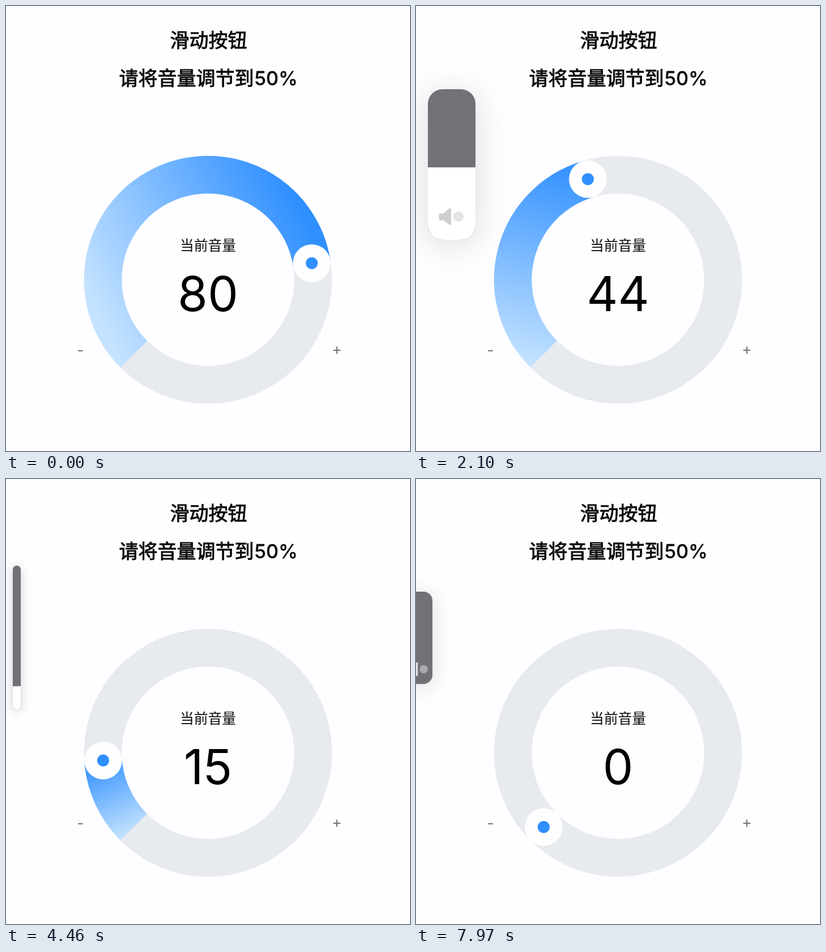
Write an HTML page that moves like this. It is 713x786 px and loops after 8000 ms.

```html
<!DOCTYPE html>
<html lang="zh-CN">
<head>
<meta charset="utf-8">
<title>滑动按钮</title>
<style>
  html, body { margin: 0; width: 100%; height: 100%; overflow: hidden; background: #fefdff; }
  #dial { position: absolute; left: 0; top: 0; width: 713px; height: 786px; }
  text { font-family: Inter, "Noto Sans CJK SC", "Noto Sans CJK", sans-serif; fill: #0b0b0d; }
  .cjk { font-family: "Noto Sans CJK SC", "Noto Sans CJK", sans-serif; }
  .head { font-size: 34px; stroke: #0b0b0d; stroke-width: .9px; }
  .head.latin { font-weight: 500; stroke-width: .3px; }
  .sign { font-size: 27px; fill: #77777b; }
  #hud { position: absolute; overflow: hidden; background: #737175; }
  #level { position: absolute; left: 0; right: 0; bottom: 0; background: #fff; }
  #icons { position: absolute; width: 46px; height: 34px; margin: -17px 0 0 -23px; }
</style>
</head>
<body>
<svg id="dial" viewBox="0 0 713 786">
  <defs>
    <linearGradient id="blue" gradientUnits="userSpaceOnUse">
      <stop offset="0" stop-color="#c5e3ff"/>
      <stop offset="1" stop-color="#2f8fff"/>
    </linearGradient>
  </defs>
  <text class="cjk head" x="357.5" y="72.5" text-anchor="middle">滑动按钮</text>
  <text class="cjk head" x="199.5" y="140">请将音量调节到</text>
  <text class="head latin" x="438.5" y="139.5">50%</text>
  <circle cx="356.5" cy="483.5" r="185.5" fill="none" stroke="#e7eaef" stroke-width="66.5"/>
  <path id="arc" fill="none" stroke="url(#blue)" stroke-width="66.5"/>
  <g id="knob">
    <circle r="33.3" fill="#fffeff"/>
    <circle r="10.6" fill="#2f8fff"/>
  </g>
  <text class="cjk" x="356.5" y="432" font-size="24.7" text-anchor="middle">当前音量</text>
  <text id="num" x="356.5" y="539" font-size="85.5" text-anchor="middle" style="fill:#000">80</text>
  <text class="sign" x="131.5" y="616.5" text-anchor="middle">-</text>
  <text class="sign" x="584" y="615.5" text-anchor="middle">+</text>
</svg>
<div id="hud">
  <div id="level"></div>
  <svg id="icons" viewBox="0 0 46 34">
    <path id="speaker" d="M2 11.5h6.5L19 2.5q3-1.5 3 1v27q0 2.5-3 1L8.5 23.5H2q-1.5 0-1.5-1.5v-9q0-1.5 1.5-1.5z"/>
    <circle id="dot" cx="35" cy="17" r="9"/>
  </svg>
</div>
<script>
  const LOOP = 8000, CX = 356.5, CY = 483.5, R = 185.5;
  const LAG = 270; // the side bar trails the dial
  const $ = id => document.getElementById(id);
  const mix = (a, b, k) => a + (b - a) * k;
  const clamp = k => Math.min(1, Math.max(0, k));
  const ease = (t, from, span) => {
    const k = clamp((t - from) / span);
    return k * k * (3 - 2 * k);
  };

  // [time, volume] of the drag
  const DRAG = [[0, 80], [1420, 54.8], [2680, 34.5], [3480, 19.7], [4460, 15.1], [6800, 14.9], [7460, 0]];

  function volume(t) {
    const i = DRAG.findIndex(p => p[0] > t);
    if (i < 0) return 0;
    if (i === 0) return DRAG[0][1];
    const [t0, v0] = DRAG[i - 1], [t1, v1] = DRAG[i];
    return mix(v0, v1, (t - t0) / (t1 - t0));
  }

  function point(v) {
    const a = (135 + 2.7 * v) * Math.PI / 180;
    return [CX + R * Math.cos(a), CY + R * Math.sin(a)];
  }

  function drawDial(v) {
    const [x0, y0] = point(0), [x, y] = point(v);
    const large = v * 2.7 > 180 ? 1 : 0, over = .08;
    $('arc').setAttribute('d', v > .01 ? `M${x0} ${y0}A${R} ${R} 0 ${large} 1 ${x} ${y}` : '');
    const ends = {
      x1: mix(x0, x, -over), y1: mix(y0, y, -over),
      x2: mix(x0, x, 1 + over), y2: mix(y0, y, 1 + over)
    };
    for (const k in ends) $('blue').setAttribute(k, ends[k]);
    $('knob').setAttribute('transform', `translate(${x} ${y})`);
    $('num').textContent = Math.round(v);
  }

  function drawHud(t) {
    const again = t > 7300;
    const enter = ease(t, again ? 7650 : 400, 890);
    const thin = again ? 0 : ease(t, 2500, 370);
    const leave = again ? 0 : ease(t, 6350, 800);
    const s = mix(.45, 1, enter);
    const w = mix(84 * s, 14, thin), h = mix(266 * s, 255, thin ** 3);
    const left = mix(20.5 - 110 * (1 - s), 11.5, thin) - 52 * leave;
    const shade = mix(60 * s, 18, thin);
    const alpha = mix(.14, .2, thin) * clamp(4 * enter) * (1 - leave);
    Object.assign($('hud').style, {
      left: left + 'px', top: 280.3 - h / 2 + 'px', width: w + 'px', height: h + 'px',
      borderRadius: mix(26 * s, 7, thin) + 'px',
      boxShadow: `0 ${shade / 8}px ${shade}px rgba(0,0,0,${alpha}), 0 0 1px rgba(0,0,0,${alpha})`
    });

    const level = volume(t - LAG), dark = level < 5;
    $('level').style.height = level + '%';
    Object.assign($('icons').style, {
      left: w / 2 + 'px', top: h - mix(41.5 * s, 12, thin) + 'px',
      opacity: 1 - thin, transform: `scale(${(.5 + s / 2) * (1 - thin)})`
    });
    $('speaker').setAttribute('fill', dark ? '#e0e0e2' : '#cfced1');
    $('dot').setAttribute('fill', dark ? '#a9a8ab' : '#e4e3e6');
    $('dot').setAttribute('opacity', clamp(1 - 2 * thin));
  }

  const start = performance.now();
  function frame() {
    const t = (performance.now() - start) % LOOP;
    drawDial(volume(t));
    drawHud(t);
    requestAnimationFrame(frame);
  }
  frame();
</script>
</body>
</html>
```
